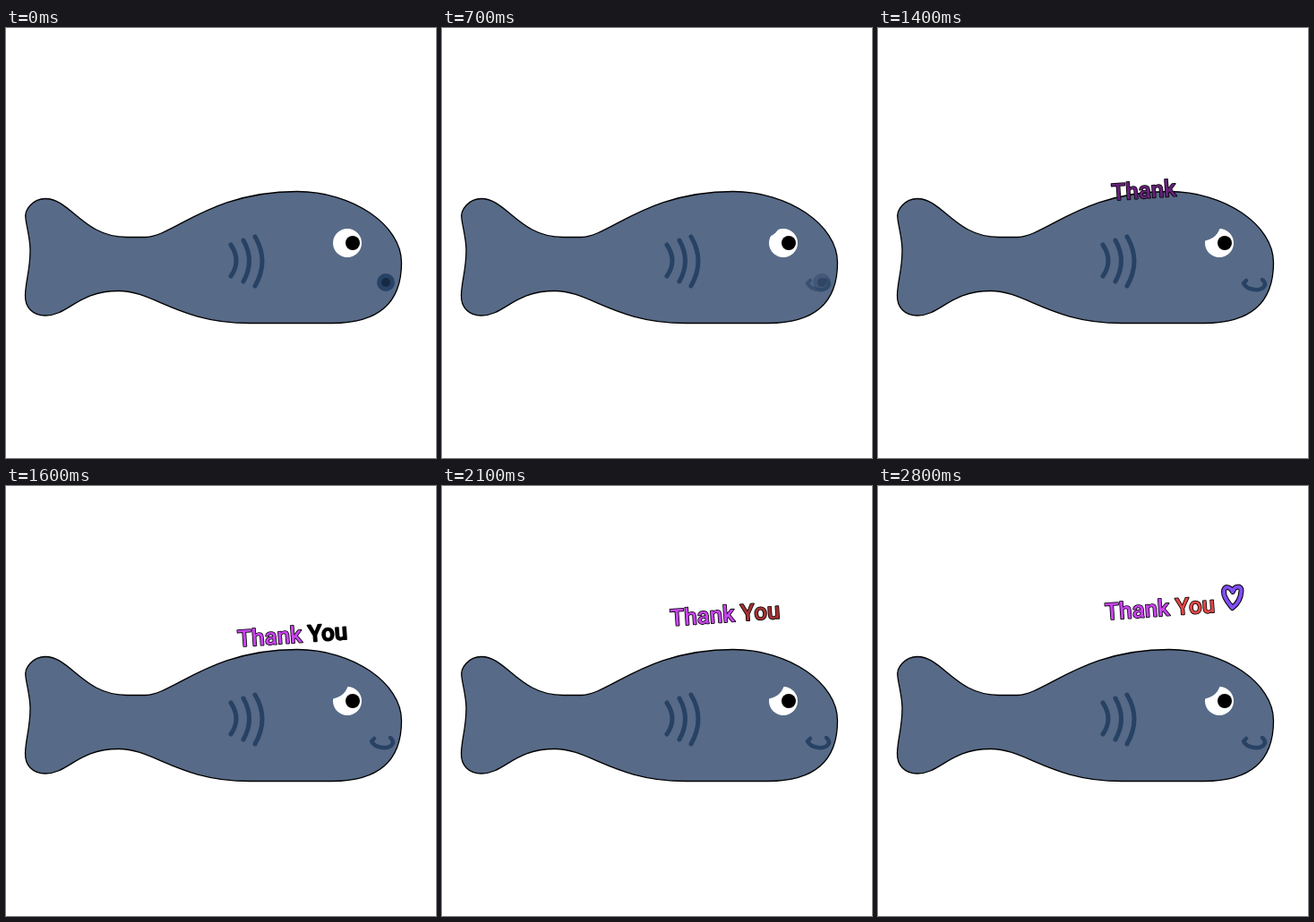
An HTML page with a canvas that plays this animation: 480 by 480 pixels, repeating every 4.3 s.

```html
<!DOCTYPE html>
<html lang="en">
<head>
<meta charset="utf-8">
<title>Thankful fish</title>
<style>
  html, body { margin: 0; width: 100%; height: 100%; overflow: hidden; background: #fff; }
  canvas { display: block; width: 480px; height: 480px; }
</style>
</head>
<body>
<canvas id="stage" width="480" height="480"></canvas>
<script>
const ctx = document.getElementById('stage').getContext('2d');
const LOOP = 4300, STEP = 100;
const SKIN = '#576a87', NAVY = '#274264';

const body = new Path2D(
  'M441.5 262 C441.5 220 387 182.5 325 182.5 C228 182.5 188 232 156 233.5 L135 233.5 ' +
  'C86 233.5 72 190.5 44 190.5 C30 190.5 20 203 22 213 C23 222 27 235 27 248 ' +
  'C27 270 22 282 21.5 298 C21 312 30 321 44 321 C70 321 80 293.5 126 293.5 ' +
  'C165 293.5 193 329.5 272 329.5 L364 329.5 C414 329.5 441.5 308 441.5 262 Z');
const gills = new Path2D('M251 242 Q263 260 251 277 M265 237 Q278 260 265 283 M278 233 Q294 260 278 288');
const smile = new Path2D('M411 282 L408 285 Q411 291 420 292 Q429 293 432 287 Q432 283 429 281');
const heart = new Path2D(
  'M395.5 136 C392 131 386 126 386 118 C386 111 393 112 396 118 ' +
  'C398 111 406 111 405.5 117 C405 126 401 132 395.5 136');
const HEART_LENGTH = 72;

const clamp = v => Math.max(0, Math.min(1, v));
const progress = (t, from, to) => clamp((t - from) / (to - from));

// Linear interpolation through [time, value] pairs
function track(t, keys) {
  for (let i = 1; i < keys.length; i++) {
    const [t0, a] = keys[i - 1], [t1, b] = keys[i];
    if (t < t1) return a + (b - a) * progress(t, t0, t1);
  }
  return keys[keys.length - 1][1];
}

// Colour brightening out of black
const glow = (rgb, k) => `rgb(${rgb.map(c => Math.round(c * k)).join(',')})`;

function disc(x, y, r, color) {
  ctx.beginPath();
  ctx.arc(x, y, r, 0, Math.PI * 2);
  ctx.fillStyle = color;
  ctx.fill();
}

function line(path, color, width) {
  ctx.strokeStyle = color;
  ctx.lineWidth = width;
  ctx.stroke(path);
}

function drawBody() {
  ctx.fillStyle = SKIN;
  ctx.fill(body);
  line(body, '#000', 1.3);
  line(gills, NAVY, 5);
}

function drawEye(t) {
  const open = t >= 400 || t < 100 ? 1 : t < 200 ? 0.5 : 0.1;
  ctx.save();
  ctx.translate(381, 240);
  ctx.scale(1, open);
  disc(0, 0, 16, '#fff');
  disc(6, 0, 8, '#000');
  ctx.restore();
  // Lid slides over the upper left of the eye
  const lid = progress(t, 400, 1000);
  if (lid > 0) disc(354 + 8 * lid, 210 + 7 * lid, 20.7, SKIN);
}

function drawMouth(t) {
  const k = progress(t, 400, 900);
  ctx.globalAlpha = 1 - k;
  disc(424, 284, 10, NAVY);
  disc(424, 284, 5, '#172a44');
  ctx.globalAlpha = k;
  line(smile, NAVY, 4.5);
  ctx.globalAlpha = 1;
}

function word(text, x, color) {
  ctx.strokeStyle = '#000';
  ctx.lineWidth = 1.6;
  ctx.strokeText(text, x, 0);
  ctx.fillStyle = color;
  ctx.fillText(text, x, 0);
}

function drawThanks(t) {
  if (t < 1400) return;
  const drop = track(t, [[1400, 43], [1600, 30], [1900, 20.5], [2200, 0]]);
  ctx.save();
  ctx.translate(254 + drop / 6, 149.5 + drop);
  ctx.rotate(-0.07);
  ctx.font = '500 26px Roboto, sans-serif';
  word('Thank', 0, glow([200, 68, 238], progress(t, 1200, 1600)));
  if (t >= 1500) {
    word('You', ctx.measureText('Thank ').width, glow([228, 70, 70], progress(t, 1600, 2300)));
  }
  ctx.restore();
}

function drawHeart(t) {
  if (t < 2200) return;
  const drawn = track(t, [[2200, 0.06], [2300, 0.18], [2500, 0.76], [2800, 1.2]]);
  ctx.save();
  ctx.setLineDash([HEART_LENGTH * drawn, 300]);
  line(heart, '#000', 6);
  line(heart, glow([130, 78, 250], progress(t, 1900, 2300)), 4);
  ctx.restore();
}

function frame(now) {
  const t = Math.floor((now % LOOP) / STEP) * STEP;
  ctx.fillStyle = '#fff';
  ctx.fillRect(0, 0, 480, 480);
  ctx.lineCap = ctx.lineJoin = 'round';
  drawBody();
  drawEye(t);
  drawMouth(t);
  drawThanks(t);
  drawHeart(t);
}

const start = performance.now();
function tick() {
  frame(performance.now() - start);
  requestAnimationFrame(tick);
}
tick();
</script>
</body>
</html>
```
